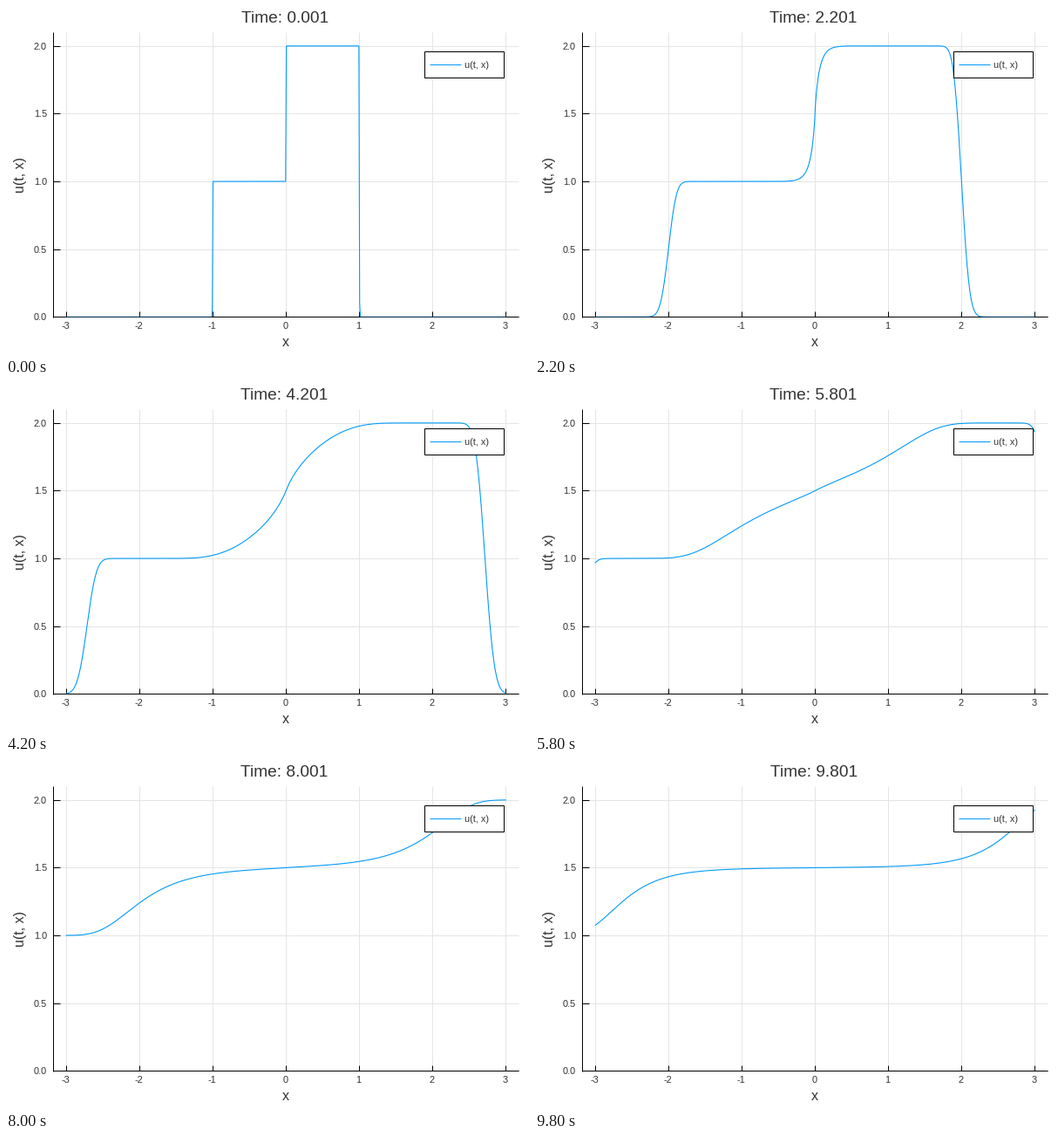
These frames come from a looping animation (600x400 px, 10 s). A matplotlib script:

```python
import numpy as np
import matplotlib.pyplot as plt
from matplotlib.animation import FuncAnimation
from matplotlib.patches import Rectangle

W, H, DPI = 600, 400, 100
FRAMES, INTERVAL = 50, 200
DT, STEPS = 0.001, 200          # solver step, steps per frame
BLUE, INK, GRID = "#009afa", "#333333", "#e5e5e5"
LEFT, RIGHT, TOP, BOTTOM = 54.3, 588.3, 30.3, 356.4

plt.rcParams["font.family"] = "Liberation Sans"


def px(x):
    return 321.2 + 83.96 * x


def py(u):
    return BOTTOM - 155.3 * u


def pt(pixels):
    return pixels * 72 / DPI


def solve(n=600):
    """Upwind solution of u_t + x / (1 + x^2) u_x = 0, one row per frame."""
    x = np.linspace(-3, 3, n)
    u = np.where(np.abs(x) <= 1, 1.0, 0.0) + np.where((x >= 0) & (x <= 1), 1.0, 0.0)
    c = x / (1 + x * x) * DT / (x[1] - x[0])
    right, left = np.maximum(c, 0), np.minimum(c, 0)
    rows = []
    for step in range((FRAMES - 1) * STEPS + 1):
        d = np.diff(u)
        new = u.copy()
        new[1:] -= right[1:] * d
        new[:-1] -= left[:-1] * d
        u = new
        if step % STEPS == 0:
            rows.append(u)
    return x, rows


fig = plt.figure(figsize=(W / DPI, H / DPI), dpi=DPI, facecolor="white")
ax = fig.add_axes([0, 0, 1, 1])
ax.set_xlim(0, W)
ax.set_ylim(H, 0)
ax.axis("off")


def line(x0, y0, x1, y1, color="black", width=1.0, **kw):
    ax.plot([x0, x1], [y0, y1], color=color, lw=pt(width),
            solid_capstyle="butt", **kw)


def label(x, y, text, size, ha="center", **kw):
    return ax.text(x, y, text, fontsize=pt(size), ha=ha, va="baseline",
                   color=INK, **kw)


for k in range(-3, 4):
    line(px(k), TOP, px(k), BOTTOM, GRID, zorder=1)
    line(px(k), BOTTOM, px(k), BOTTOM - 6, zorder=2)
    label(px(k) - 0.7, 370, str(k), 11)
for u in np.arange(0, 2.1, 0.5):
    line(LEFT, py(u), RIGHT, py(u), GRID, zorder=1)
    line(LEFT, py(u), LEFT + 7.5, py(u), zorder=2)
    label(47, py(u) + 4, f"{u:.1f}", 11, ha="right")

line(LEFT, TOP, LEFT, BOTTOM + 0.6, zorder=2)
line(LEFT, BOTTOM, RIGHT, BOTTOM, zorder=2)
line(LEFT, BOTTOM, RIGHT, BOTTOM, zorder=4, alpha=0.7)

label(321, 390, "x", 16)
label(21, 194, "u(t, x)", 16, rotation=90, rotation_mode="anchor")
title = label(319.6, 19, "", 19.2)

ax.add_patch(Rectangle((479.5, 51.5), 91, 30, fc="white", ec="black",
                       lw=pt(1), zorder=5))
line(485.5, 66.5, 521.5, 66.5, BLUE, zorder=6)
label(525.6, 71, "u(t, x)", 10.9, ha="left", zorder=6)

grid_x, states = solve()
curve, = ax.plot([], [], color=BLUE, lw=pt(1.1), zorder=3)


def draw(i):
    curve.set_data(px(grid_x), py(states[i]))
    title.set_text(f"Time: {DT + i * STEPS * DT:.3f}")
    return curve, title


anim = FuncAnimation(fig, draw, frames=FRAMES, interval=INTERVAL,
                     repeat=True, repeat_delay=0)
plt.show()
```
